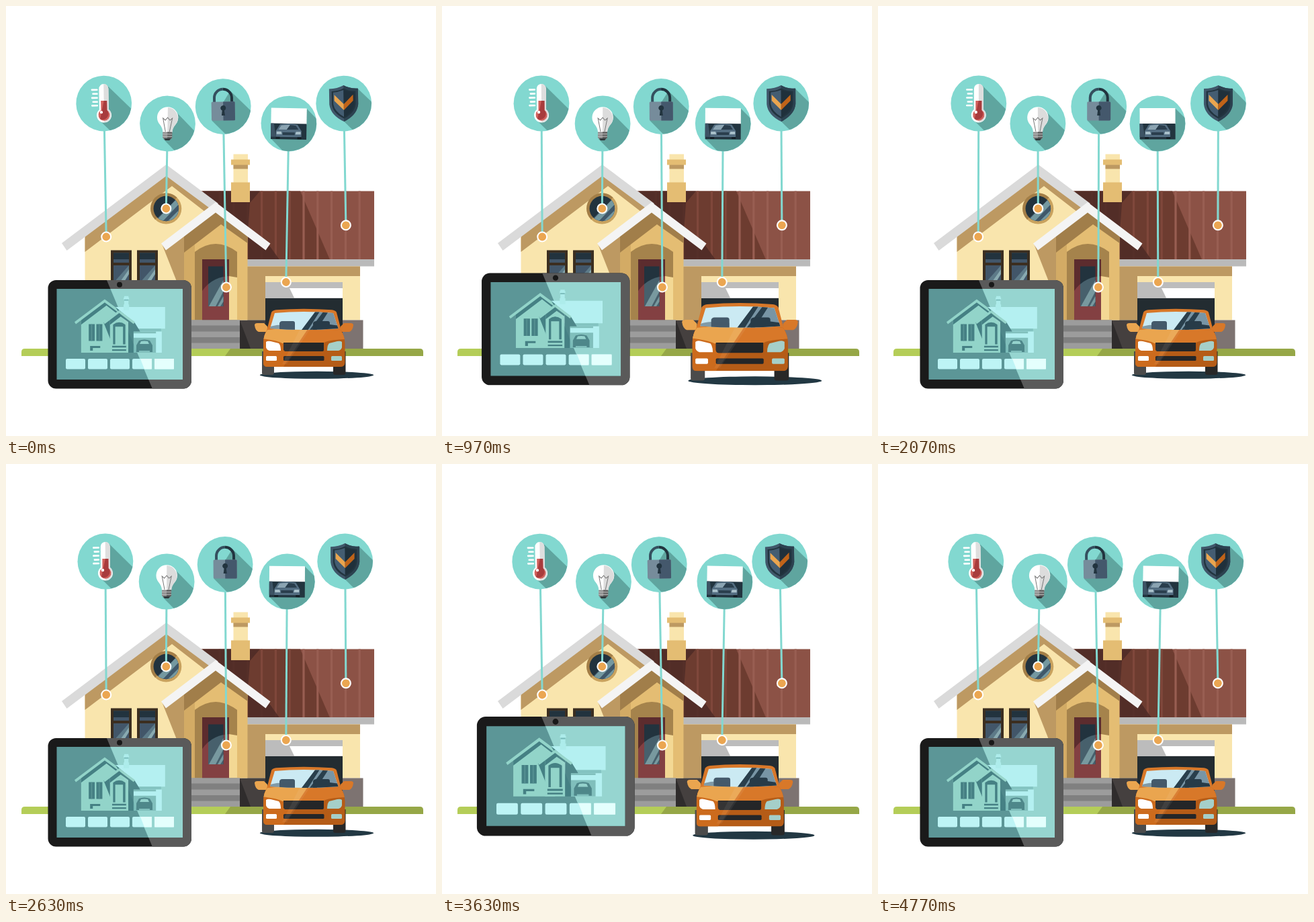
These frames come from a looping animation (640x640 px, 4.81 s). An HTML page:

```html
<!DOCTYPE html>
<html lang="en">
<head>
<meta charset="utf-8">
<title>Smart home</title>
<style>
html, body { margin: 0; width: 100%; height: 100%; overflow: hidden; background: #fff; }
svg { display: block; width: 100%; height: 100%; }
</style>
</head>
<body>
<svg viewBox="0 0 640 640" xmlns="http://www.w3.org/2000/svg">
<defs>
  <clipPath id="disc"><circle r="41.2"/></clipPath>
  <clipPath id="pane"><circle cx="238.3" cy="301.5" r="18.8"/></clipPath>
  <clipPath id="case"><rect x="62.5" y="408" width="213.5" height="161.5" rx="12"/></clipPath>
  <clipPath id="screen"><path d="M75.5 421H263V556H75.5Z"/></clipPath>
  <clipPath id="glass"><path d="M400 457Q443 453 487 457L494.500 480Q443 484 393 480Z"/></clipPath>
  <clipPath id="body"><path d="M389 482Q443 476 498 482Q504 490 504.500 502V531Q504 537 498 537H389Q383 537 383 531V502Q383 490 389 482Z"/></clipPath>
</defs>

<!-- lawn -->
<path d="M23 521V515Q23 510 28 510H340V521Z" fill="#b4cd58"/>
<path d="M334 510H616Q621 510 621 515V521H326Z" fill="#96a747"/>

<!-- main roof -->
<path d="M290 275.500H548V377.500H300Z" fill="#8c5246"/>
<path d="M290 275.500H438L482 377.500H300Z" fill="#6d3c30"/>
<g id="ribs"></g>
<path d="M363 275.500H378L363 293ZM360 328L393 358L407 377.500H360ZM293 275.500H336V292H363L360 340L312 306Z" fill="#4b2a25" opacity=".8"/>
<path d="M359 377H548V387.500H359Z" fill="#bababa"/>

<!-- chimney -->
<path d="M338.500 220.500H360V265H338.500Z" fill="#f9e5ad"/>
<path d="M338.500 236H360V242.500H338.500Z" fill="#bd9962"/>
<path d="M335 228.500H363V236.500H335ZM335 262.500H363V292H335Z" fill="#e4bd73"/>

<!-- garage wing -->
<path d="M359 387.500H527V467.500H359Z" fill="#f9e5ad"/>
<path d="M359 387.500H527V402H386V467.500H359Z" fill="#bd9962"/>
<path d="M348 467.500H387V510H348Z" fill="#45403f"/>
<path d="M348 467.500L364 510H348Z" fill="#2f2c2c"/>
<path d="M500 467.500H531.500V510H500Z" fill="#7d7371"/>
<path d="M386 434H501V510H386Z" fill="#232c31"/>
<path d="M386 411H501V435H386Z" fill="#bcbcbc"/>
<path d="M422 420H501V434.500H429Z" fill="#fff"/>

<!-- front gable -->
<path d="M117.500 467V345L238 250L312 305V467Z" fill="#f9e5ad"/>
<path d="M117.500 366V340L238 246L306 298L296 306L247 268Z" fill="#bd9962"/>
<path d="M232 354L268 330V445Z" fill="#bd9962"/>
<path d="M83 353L238.500 236L316 294L306 303L238.500 253L90.500 364Z" fill="#dadada"/>
<circle cx="238.300" cy="301.500" r="23" fill="#c9a25e"/>
<path d="M222 318A23 23 0 0 1 254.500 285Z" fill="#a37e47"/>
<g clip-path="url(#pane)">
  <path d="M215 278H262V325H215Z" fill="#22333e"/>
  <path d="M219 322L259 282V325H219Z" fill="#40586a"/>
  <path d="M222 321L255 286L260 292L230 324ZM239 322L259 302V309L246 322Z" fill="#7498a0"/>
</g>
<g id="win">
  <path d="M156 363.500H187V420H156Z" fill="#3b2e20"/>
  <path d="M160 367.500H183V420H160Z" fill="#425669"/>
  <path d="M160 367.500H183V377H160Z" fill="#22333e"/>
  <path d="M160 412L183 386V396L166 420H160Z" fill="#5d7a88"/>
  <path d="M163 420L183 392V399L170 420Z" fill="#89aab0"/>
  <path d="M160 382H183V386H160Z" fill="#3b2e20"/>
</g>
<use href="#win" x="39"/>

<!-- porch -->
<path d="M265 467.500V343L312 305L359.500 341V467.500Z" fill="#e4bd73"/>
<path d="M265 467.500V362L281 351V467.500Z" fill="#d3ab65"/>
<path d="M265 367V340L312 304L359.500 340V353L320 325Z" fill="#a17e4a"/>
<path d="M281 467.500V366Q312 342 344 366V467.500Z" fill="#a5834c"/>
<path d="M292 377H332V467.500H292Z" fill="#5c2c2e"/>
<path d="M292 467.500V424Q306 404 332 402V467.500Z" fill="#834042"/>
<path d="M332 402L344 404V467.500H332Z" fill="#f3d894"/>
<path d="M301 387.500H323.500V447H301Z" fill="#22333e"/>
<path d="M301 447V414Q310 406 323.500 403V447Z" fill="#47606c"/>
<path d="M302 447L323.500 408V425L312 447Z" fill="#78999f"/>
<path d="M315 447L323.500 432V440L319 447Z" fill="#78999f"/>
<path d="M231 353.500L312 292L393.500 353.500L386.500 363.500L312 307.500L238 363.500Z" fill="#f4f4f4"/>

<!-- steps -->
<path d="M270 467.500H348V510H270Z" fill="#808080"/>
<path d="M270 467.500H348V475.500H270ZM270 484.500H348V493H270ZM270 501.500H348V510H270Z" fill="#9c9c9c"/>

<g id="pins"></g>

<g id="car">
  <ellipse cx="462.500" cy="549.300" rx="84.700" ry="5.500" fill="#223843"/>
  <path d="M381 514H399V546Q399 549 396 549H384Q381 549 381 546Z" fill="#4b4b4b"/>
  <path d="M487 514H505.500V546Q505.500 549 502 549H490Q487 549 487 546Z" fill="#282828"/>
  <path d="M389 485H376Q371 483 370 475Q370 472 374 472H384L389 477Z" fill="#eaa54f"/>
  <path d="M498 485H511Q516 483 517 475Q517 472 513 472H503L498 477Z" fill="#d87829"/>
  <path d="M387 487L395 456Q397 453 402 452.300Q443 449 485 452.300Q490 453 492 456L500 487Z" fill="#d87829"/>
  <g clip-path="url(#body)">
    <path d="M380 475H508V540H380Z" fill="#b55c17"/>
    <path d="M380 475H453L411 540H380Z" fill="#cc6b1d"/>
    <path d="M380 475H508V496Q478 497 472 502H411Q405 498 380 495Z" fill="#d87829"/>
    <path d="M380 475H453L435 502H411Q405 498 380 495Z" fill="#eaa54f"/>
  </g>
  <g clip-path="url(#glass)">
    <path d="M390 450H497V486H390Z" fill="#cbeaf3"/>
    <path d="M470 450H497V486H438Z" fill="#7895a5"/>
    <path d="M470 450L447 486H437L464 450ZM483 450L460 486H449L476 450Z" fill="#293f4c"/>
    <path d="M407 486V472Q408 469 411 469H427Q430 469 430 472V486Z" fill="#445a6b"/>
    <path d="M457 486V472Q458 469 462 469H479Q482 469 482 472V474L496 476V486Z" fill="#273b48"/>
    <path d="M393 477Q410 472 430 476V486H393Z" fill="#445a6b" opacity=".55"/>
  </g>
  <path d="M387 500Q389 498 394 499L406 502Q409 505 409 513H392Q388 512 387 508Z" fill="#fff"/>
  <path d="M500 500Q498 498 493 499L481 502Q478 505 478 513H495Q499 512 500 508Z" fill="#a5cfc9"/>
  <path d="M413 501H473V512Q473 514 471 514H416Q413 513 413 510Z" fill="#242628"/>
  <rect x="413" y="521" width="60.500" height="7" rx="1.500" fill="#242628"/>
  <path d="M413 502H436L428 514H416Q413 513 413 510ZM414 521.500H424L420 527.500H414Z" fill="#343434"/>
  <path d="M452 482L418 533H411L437 482Z" fill="#fff" opacity=".06"/>
  <rect x="387" y="521" width="16" height="7" rx="1.500" fill="#fff"/>
  <rect x="484" y="521" width="16" height="7" rx="1.500" fill="#a5cfc9"/>
</g>

<g id="tablet">
  <g clip-path="url(#case)">
    <path d="M62 407H277V570H62Z" fill="#1a1a1a"/>
    <path d="M149.500 407H277V570H218Z" fill="#5a5a5a"/>
  </g>
  <circle cx="169" cy="414.800" r="4" fill="#191919"/>
  <path d="M75.500 421H263V556H75.500Z" fill="#5c9697"/>
  <path d="M155.400 421H263V556H212Z" fill="#90d3cd"/>
  <g clip-path="url(#screen)">
    <!-- small copy of the house, in house coordinates -->
    <g transform="translate(77.9 368) scale(.29)">
      <path d="M293 275.500H548V387H359L312 330Z" fill="#b0eff0"/>
      <path d="M338 220H360V292H338ZM335 228H363V237H335ZM335 263H363V292H335Z" fill="#a9ebea"/>
      <path d="M338 237H360V243H338Z" fill="#6fb5b4"/>
      <path d="M359 387H527V402H359Z" fill="#7cc0be"/>
      <path d="M386 402H531V510H386Z" fill="#b0eff0"/>
      <path d="M386 434H501V510H386Z" fill="#79bbb8"/>
      <path d="M386 402H501V411H386Z" fill="#79bbb8"/>
      <path d="M117 510V345L238 250L312 305V510Z" fill="#92d4c9"/>
      <path d="M117 366V340L238 246L306 298L296 306L247 268ZM232 354L268 330V445Z" fill="#458084"/>
      <path d="M83 353L238 236L316 294L306 303L238 253L90 364Z" fill="#92d4c9"/>
      <path d="M156 364H187V450H156ZM195 364H226V450H195Z" fill="#458084"/>
      <path d="M171 364V450M210 364V450" stroke="#5c9697" stroke-width="4"/>
      <path d="M265 510V343L312 305L359 341V510Z" fill="#92d4c9"/>
      <path d="M265 367V340L312 304L359 340V353L320 325ZM281 467V366Q312 342 344 366V467H332V377H292V467Z" fill="#458084"/>
      <path d="M312 306L293 276L393 358L420 402H386V510H359V341Z" fill="#458084"/>
      <path d="M231 353L312 292L393 353L386 363L312 307L238 363Z" fill="#92d4c9"/>
      <path d="M276 475H348V484H276ZM276 493H348V501H276ZM163 476H215V486H177V500H163Z" fill="#458084"/>
    </g>
    <path d="M194 515V505L198 498Q206 495 214 498L218 505V515H214V513H198V515Z" fill="#458084"/>
    <path d="M199 503L201 499Q206 498 211 499L213 503Z" fill="#8ed0c9"/>
    <g id="keys" fill="#bdf4f5"></g>
    <path d="M155.400 421H263V556H212Z" fill="#fff" opacity=".05"/>
  </g>
</g>
</svg>
<script>
const LOOP = 4810, BEAT = LOOP / 8;
const $ = id => document.getElementById(id);

$('ribs').innerHTML = Array.from({ length: 11 }, (_, i) => {
  const x = 316.6 + i * 20.8;
  return `<path d="M${x} 275.5h3.2v102h-3.2z" fill="${x < 440 ? '#7f473b' : '#985e52'}"/>`;
}).join('');

$('keys').innerHTML = [0, 1, 2, 3, 4].map(i =>
  `<rect x="${89 + i * 33}" y="525" width="29" height="15.500" rx="2"/>`).join('') +
  '<path d="M200 525H217V540.500H206ZM221 525H250V540.500H221Z" fill="#e2fffd"/>';

const shade = d => `<path d="${d}" fill="#5fa59f"/>`;
const bars = [-20.5, -14.5, -8.5, -2.5, 3];

const thermo = shade('M5-27L60 28V70H38L-8 24Z') +
  `<path d="M-7-22A7 7 0 0 1 7-22V9A11 11 0 1 1-7 9Z" fill="#fff"/>
  <path d="M0-29A7 7 0 0 1 7-22V9A11 11 0 0 1 0 28Z" fill="#dedede"/>
  <path d="M-4.500-4H4.500V10A8.500 8.500 0 1 1-4.500 10Z" fill="#d2605c"/>
  <path d="M0-4H4.500V10A8.500 8.500 0 0 1-6 23Z" fill="#a83c3d"/>
  <circle cx="-4" cy="13" r="2.200" fill="#fff"/>` +
  bars.map((y, i) => `<path d="M${i % 2 ? -16 : -17.5} ${y}H-10" stroke="#fff" stroke-width="2.600" stroke-linecap="round"/>`).join('');

const bulb = shade('M10-20L60 30V70H41L-6 23Z') +
  `<path d="M-7 13Q-7 7-12 1A15.700 15.700 0 1 1 12 1Q7 7 7 13Z" fill="#fff"/>
  <path d="M0-24A15.700 15.700 0 0 1 12 1Q7 7 7 13H0Z" fill="#dcdcdc"/>
  <path d="M-3 12L-7-8L-3.500-5L0-9L3.500-5L7-8L3 12" fill="none" stroke="#777" stroke-width="1"/>
  <path d="M-7 12.500H7V21L3 25H-3L-7 21Z" fill="#8b8b8b"/>
  <path d="M0 12.500H7V21L3 25H0Z" fill="#5f5f5f"/>
  <path d="M-7 15.500H7M-7 19H7" stroke="#c8c8c8" stroke-width="1"/>
  <path d="M-5 22H5L3 25H-3Z" fill="#303a3d"/>`;

const lock = shade('M11-23L60 26V70H31L-17 21Z') +
  `<path d="M-13-6V-13A13 13 0 0 1 0-25.700" fill="none" stroke="#35505f" stroke-width="4"/>
  <path d="M0-25.700A13 13 0 0 1 13-13V-6" fill="none" stroke="#22343f" stroke-width="4"/>
  <rect x="-17.500" y="-7" width="35" height="28" rx="1.500" fill="#768c9b"/>
  <path d="M0-7H16Q17.500-7 17.500-5.500V19.500Q17.500 21 16 21H0Z" fill="#44586c"/>
  <path d="M-1.600 6A4 4 0 1 1 1.600 6L2.500 13.500H-2.500Z" fill="#22343f"/>`;

const garage = shade('M26-23L70 21V70H21L-26 23Z') +
  `<path d="M-26.500-23H26.500V1H-26.500Z" fill="#fff"/>
  <path d="M-26.500 0H26.500V23.500H-26.500Z" fill="#22343f"/>
  <path d="M-26.500 0H-22L-19 20H-26.500Z" fill="#3d5364"/>
  <path d="M-19 20V11L-13 1.500Q0-1 13 1.500L19 11V20Z" fill="#536d81"/>
  <path d="M-15 9L-11 3Q0 1 11 3L15 9Z" fill="#8ba4b2"/>
  <path d="M2 2Q7 2 11 3L15 9H-3ZM-9 13H9V17H-9Z" fill="#2a3e4d"/>
  <path d="M-18 12H-11L-10 16H-18ZM18 12H11L10 16H18Z" fill="#a9c0ca"/>
  <path d="M-19 20H-13V23H-19ZM13 20H19V23H13Z" fill="#131d24"/>`;

const crest = 'M0-27Q9-22 21.500-22V1Q20 17 0 27Q-20 17-21.500 1V-22Q-9-22 0-27Z';
const shield = shade('M20-23L62 19V70H43L0 27Z') +
  `<path d="${crest}" fill="#40576a"/>
  <path d="M0-27Q9-22 21.500-22V1Q20 17 0 27Z" fill="#2c4250"/>
  <path d="${crest}" transform="scale(.83)" fill="#22343f"/>
  <path d="M0-20Q-8-17-15.500-16.500V1Q-14 12 0 20Z" fill="#445d72"/>
  <path d="M0-20Q8-17 15.500-16.500V1Q14 12 0 20Z" fill="#1f303b"/>
  <path d="M-14-13L0 1V10L-14-4Z" fill="#eaa54f"/>
  <path d="M14-13L0 1V10L14-4Z" fill="#bf6319"/>`;

// pivot x, pivot y, disc y, swing direction, icon
const pins = [
  [149.2, 343.5, 145, 1, thermo],
  [238.3, 301.5, 175, -1, bulb],
  [327.9, 418.5, 149.5, 1, lock],
  [416.8, 411, 175, -1, garage],
  [505.9, 326.3, 145, 1, shield]
];
$('pins').innerHTML = pins.map(([x, y, top, , icon]) =>
  `<g><path d="M${x} ${y}V${top}" stroke="#82d8d0" stroke-width="3"/>
  <g transform="translate(${x} ${top})"><circle r="41.400" fill="#82d8d0"/><g clip-path="url(#disc)">${icon}</g></g>
  <circle cx="${x}" cy="${y}" r="8" fill="#fff"/><circle cx="${x}" cy="${y}" r="5.900" fill="#eba651"/></g>`).join('');
const arms = [...$('pins').children];

// one smooth rise and fall lasting two beats
const bump = (t, start) => {
  const u = (t - start) / (2 * BEAT);
  return u > 0 && u < 1 ? (1 - Math.cos(2 * Math.PI * u)) / 2 : 0;
};
const twice = (t, start) => bump(t, start) + bump(t, start + 5 * BEAT);
const zoom = (el, x, y, s, dy = 0) =>
  el.setAttribute('transform', `translate(${x} ${y + dy}) scale(${s}) translate(${-x} ${-y})`);

function draw(t) {
  const swing = -Math.cos(Math.PI * t / BEAT);
  pins.forEach(([x, y, , dir], i) =>
    arms[i].setAttribute('transform', `rotate(${dir * swing} ${x} ${y})`));
  const lift = twice(t, 0);
  zoom($('tablet'), 169.3, 489, 1 + .1 * lift, -24 * lift);
  zoom($('car'), 443.5, 500.5, 1 + .174 * twice(t, 360));
}

const begin = performance.now();
function tick() {
  draw((performance.now() - begin) % LOOP);
  requestAnimationFrame(tick);
}
tick();
</script>
</body>
</html>
```
